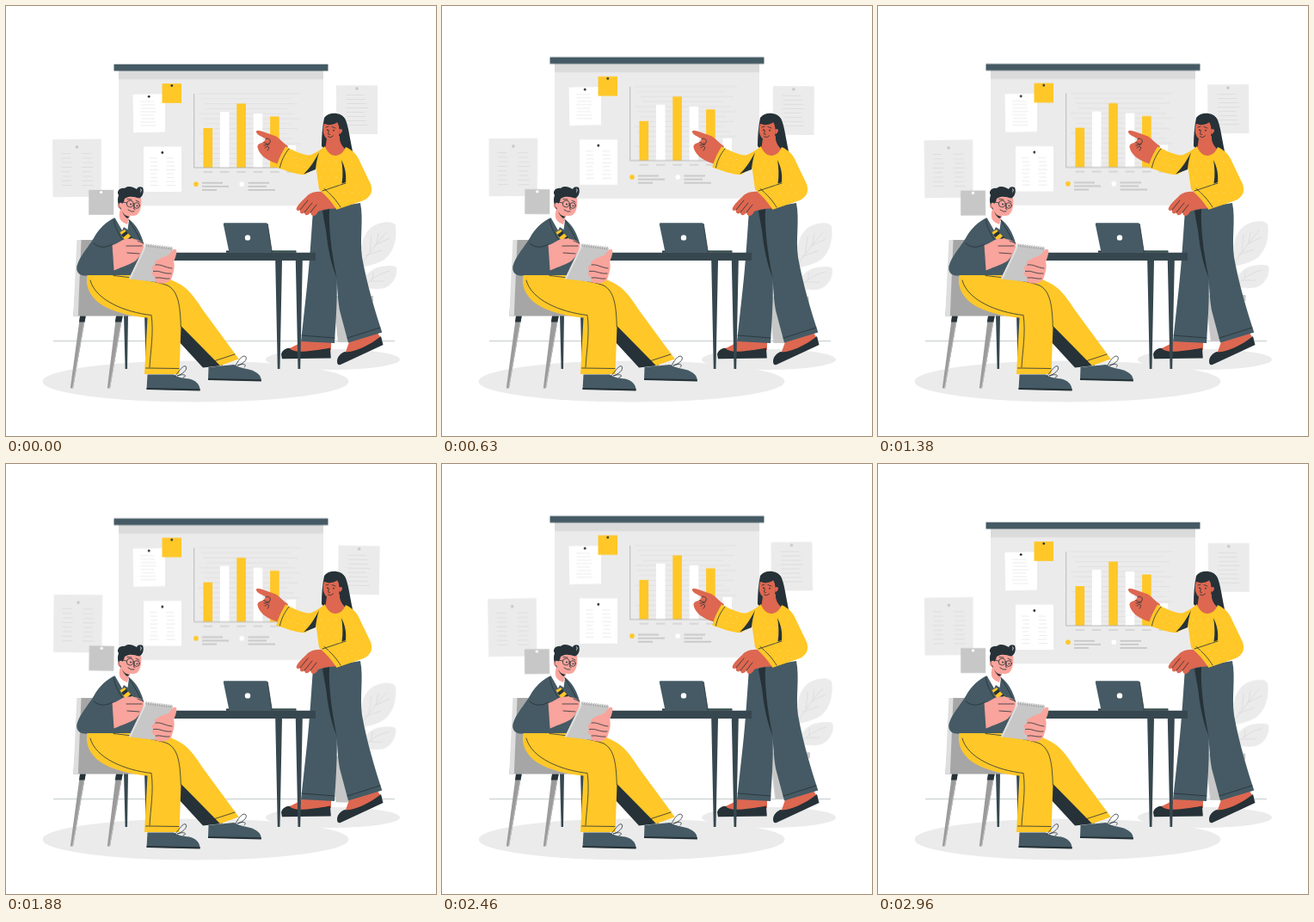
Write an HTML page that moves like this. It is 500 px wide and 500 px high and loops after 3000 ms.

```html
<!DOCTYPE html>
<html lang="en">
<head>
<meta charset="utf-8">
<title>Office presentation</title>
<style>
html, body { margin: 0; width: 100%; height: 100%; overflow: hidden; background: #fff; }
svg { display: block; width: 100vw; height: 100vh; }
#wall { transform-origin: 250px 250px; }
.y { fill: #ffc727; }
.s { fill: #455a64; }
.d { fill: #263238; }
.t { fill: #37474f; }
.w { fill: #fff; }
.l { fill: #ebebeb; }
.g { fill: #c7c7c7; }
.p { fill: #f9a49c; }
.r { fill: #dd6750; }
.ink { fill: none; stroke: #263238; stroke-width: .8; stroke-linecap: round; stroke-linejoin: round; }
.vein { fill: none; stroke: #dadada; stroke-width: .8; stroke-linecap: round; }
</style>
</head>
<body>
<svg viewBox="0 0 500 500">
  <!-- floor -->
  <ellipse class="l" cx="220.5" cy="436.5" rx="178" ry="24"/>
  <ellipse class="l" cx="380" cy="411" rx="78" ry="12"/>
  <path d="M55 389.6H452" stroke="#8a959b" stroke-width=".5"/>

  <g id="board">
    <rect class="l" x="131" y="75" width="238" height="157.3"/>
    <rect x="131" y="75" width="238" height="10.3" fill="#dbdbdb"/>
    <rect class="s" x="125.5" y="67.7" width="249" height="7.8"/>
    <g id="chart"></g>
    <path d="M218.7 102V188H343" fill="none" stroke="#adadad" stroke-width=".8"/>
    <rect class="y" x="218.3" y="204.5" width="5.4" height="5.4" rx="1.8"/>
    <rect class="w" x="271.5" y="204.5" width="5.4" height="5.4" rx="1.8"/>
    <path class="w" d="M147.5 102.8L185 102.3V146.6L148.3 147.2Z"/>
    <path class="w" d="M160 163.5H204V216H160Z"/>
    <path class="y" d="M181.5 90.2H204V112.8H181.5Z"/>
    <g id="boardText"></g>
    <circle class="d" cx="166.2" cy="105.3" r="1.4"/>
    <circle class="d" cx="181.8" cy="170.5" r="1.4"/>
    <circle class="d" cx="192.8" cy="92.6" r="1.4"/>
  </g>

  <g id="wall">
    <path class="l" d="M54 155.2L110.7 154.6V221.8L54.5 222.2Z"/>
    <path class="l" d="M384 92.2H432V149H384.3Z"/>
    <path class="g" d="M96.2 213.8H125.2V242.8H96.2Z"/>
    <g id="wallText"></g>
    <circle class="g" cx="82.5" cy="164" r="1.8"/>
    <circle class="g" cx="408" cy="96" r="1.8"/>
    <circle class="w" cx="110.6" cy="216.6" r="1.7"/>
    <!-- plant -->
    <path class="l" d="M412 304C410 285 414 267 424 258C434 250 450 249 453 255C455 268 452 284 442 293C433 300 421 302 412 304Z"/>
    <path class="l" d="M412 330C414 315 424 305 436 303C445 302 453 301 454.3 305C455 315 449 326 438 328.5C430 330 420 327 412 330Z"/>
    <path class="vein" d="M412 302C421 290 434 272 443 262M423 286L425 267M431 276L433 264M419 290L437 284M429 278L446 270M412 330C423 318 434 311 446 308M426 318L427 309M423 320L439 320"/>
    <path class="g" d="M376 337H427V344H422L417 391H386L381 344H376Z"/>
  </g>

  <!-- woman -->
  <path class="d" d="M370 130C375 123 389 123 394 131C398 138 399 150 404 173C390 176 377 173 367 163C367 151 368 140 370 130Z"/>
  <path class="r" d="M344 389H378V400L334 404L328 399C334 396 341 393 344 389Z"/>
  <path class="r" d="M400 388L432 380L437 388L402 407L395 402Z"/>
  <path class="d" d="M320 405C321 400 327 397 330 398C334 404 352 402 377 397.5L377.8 409.5L321 410.2Z"/>
  <path class="d" d="M385 413C385 408 390 403 394 402C400 404 420 397 436 384L438.5 394L389 417C386 418 385 416 385 413Z"/>
  <path class="s" d="M357 238C355 265 353 300 350 326L343 390L382 392C384 360 386 330 384 304C385 322 385 336 388 354L398 391.5L437.3 379.5C429 354 420 325 414 292C411 270 416 249 412 229Z"/>
  <path class="d" d="M368 238L376 236C375 256 378 284 384.5 316C378 300 374 280 372.5 264C371 254 369 246 368 238Z"/>
  <path class="ink" d="M344 383L382 386M397 386L435 374" stroke-width=".6"/>
  <path class="r" d="M373 154L388 151C388 160 391 164 397 167L392 175L376 176L371 168Z"/>
  <path class="r" d="M370 136C374 140 383 138 386 134C389 143 389 151 384 155C379 158 372 156 370 150C368 146 369 141 370 136Z"/>
  <path class="d" d="M369.5 137C371 126 388 122 394 131C398 141 398 157 403 172C396 169 390 164 388 154C388 146 388 139 385 135C381 137 374 137 369.5 137Z"/>
  <path class="r" d="M387 144C391 141 393 146 388 149Z"/>
  <path class="ink" d="M372 141L375 140M379 140.5L383 142M375.5 145L374.5 149L376.5 149.5M374.5 152Q378 154 380.5 151M392 139Q395 158 402 169"/>
  <circle class="d" cx="374" cy="144.2" r=".9"/><circle class="d" cx="381" cy="144.6" r=".9"/>
  <path class="r" d="M290.8 146.5C291 144 294 144.5 297 145.6L314 151.5C319 155 323 160 328 163L319 184C311 183 303 178 299 175C295 171 293 167 292.5 164C292 161 296 159 299.5 158.5L302 154.5C298 152 292 150 290.8 146.5Z"/>
  <path class="ink" d="M302 154.5C306 153 308 156 307 159C304 162 302 159 299.5 158.5M301 165C306 161 307 165 304 168M300 162L306 161" stroke-width=".7"/>
  <path class="y" d="M325 163.5C336 169 349 175 355 173C362 170 367 166 371 163C376 178 390 177 395 164C404 168 409 174 412 182L424 207C427 216 424 222 416 226L384.5 236.8C379 230 374 223 366.3 215.5L364 213L360.5 188L348 196C336 196 325 191 314.2 187.4C317 178 321 170 325 163.5Z"/>
  <path class="d" d="M346 195.5C354 188 360 178 364 170C361.5 178 360.5 184 360 190Z"/>
  <path class="d" d="M390 179C394 187 396 195 395 205L390.5 206.5C392 197 391.5 187 390 179Z"/>
  <path class="ink" d="M329 166C324 172 320 180 318.5 188M370 212.5C378 219 385 227 389 234M368 215L395 206" stroke-width=".7"/>
  <g id="dots" fill="#fff" fill-opacity=".5"></g>
  <path class="r" d="M366.5 215.8C359 215 352 218 349 222C345 226 340 230 337.8 235C337 238 340 239 342 237C341 241 344 243 347 240C347 244 351 244.5 354 240C355 246 360 245 363 239C370 236 376 235.5 383.5 235.5Q376 224 366.5 215.8Z"/>
  <path class="ink" d="M342 237L351 226M347 240L356 229M354 240L361 231" stroke-width=".7"/>

  <!-- chair and rear table legs -->
  <path class="t" d="M137 358H142L141 422H138.6ZM161 358H166L165 412H162.5Z"/>
  <path d="M84.5 272H112L120 312L163 352V360.5H78.3Z" fill="#a6a6a6"/>
  <path d="M82.4 272H87.5L83.8 360.5H78.3Z" fill="#dedede"/>
  <path d="M86 361H92.5L78 444.5H74.8ZM128 361H135.5L121 444.5H117.8Z" fill="#9b9b9b"/>
  <path d="M91 367L77.5 444M134 367L120.5 444" stroke="#bdbdbd"/>
  <path class="d" d="M86 360.5H92.8L91.5 367.5H85ZM128 360.5H135.8L134.3 367.5H126.8Z"/>

  <!-- table and laptop -->
  <path class="t" d="M190 286.7H360V296H190ZM313.2 296H321L318.5 422H315.8ZM336.8 296H344.8L342.2 422H339.5Z"/>
  <path class="d" d="M256 284.5H337.5V286.8H256Z"/>
  <path d="M308 285H337" stroke="#456b63"/>
  <path class="s" d="M254 252.2H302.5Q304 252.2 304.3 253.7L309.3 286.6H259.5L252.8 253.7Q252.5 252.2 254 252.2Z"/>
  <path class="ink" d="M304.3 253.7L309.3 286.3" stroke-width=".6"/>
  <circle class="w" cx="281" cy="269.4" r="3.2"/>

  <!-- man: body -->
  <path class="s" d="M127 246C117 250 108 259 102.5 269C96 280 85.5 291 82.5 302C81 309 85 313 91 313.5L126 315H152L160 276C157 264 151 254 143 248Z"/>
  <path class="w" d="M126.5 246L131 240L143 249L141.5 260L137 257L135 261Z"/>
  <path class="p" d="M133 236L145 240L141 254L136 251.5C131 248 131 243 133 236Z"/>
  <path class="y" d="M132.5 263L138 260L142 264.5L148 271L141 275L135.5 268.5Z"/>
  <path class="d" d="M134 266L140 261.5L142 264.5L136.5 269ZM139 272.5L145.5 267.5L147 269.5L141 274.5Z"/>
  <path class="ink" d="M125 248C127 259 132 267 138 276M143 249C148 257 153 265 156 272M102 276C110 283 118 280 124 277M124 278L126 306" stroke-width=".8"/>

  <!-- man: legs -->
  <path class="d" d="M200 368L252 418L229 420.5L200 389Z"/>
  <path class="y" d="M94.5 313H168C184 314 202 321 211 330C219 338 224 346 230 355L270.8 410.5L249 418.3L203.5 372L201.5 428H161L164.5 362.5C145 361 122 355 109 346C97 337 92 325 94.5 313Z"/>
  <path class="ink" d="M125 313.5C150 316 175 320 188 325C201 332 202.5 350 203.3 373" stroke-width="1.1"/>
  <path class="ink" d="M162.5 421L201 421.5M243 412.5L266 405M98 319C104 342 138 356 169 359.5C172 380 168 401 167 420" stroke-width=".7"/>
  <path class="s" d="M164.5 428.5H195C200 432 207 433 213 433.5C220 435 226 440 225.5 447L163.5 445.8Z"/>
  <path class="d" d="M163.5 444L225.8 445.3L225.5 447.5L163.5 446Z"/>
  <path class="s" d="M235.5 420L265 417C272 421 279 421.5 284 423C291 425 297 429 296.8 436L235 434.5Z"/>
  <path class="d" d="M235 433L296.8 434.3V436.5L235 435Z"/>
  <path class="ink" d="M196 431C202 424 206 417 209 419C212 423 204 429 199 430C207 427 212 430 206 432M267 418C271 410 276 405 279 408C281 412 274 417 269 418C276 415 281 417 277 420"/>

  <!-- man: head -->
  <path class="p" d="M134 219C141 222 151 219 157 223C158 230 157 239 152 243C145 246 136 242 134 236C129 236 128 229 133 229Z"/>
  <path class="d" d="M133.5 237C130 231 129 225 131 220C128 216 132 211 138 212C142 208 149 211 152 213C153 210 156 209.5 159 211C161 216 159 222 155 223.5C149 222 144 220 138 224C137 228 136 230 134.5 230Z"/>
  <path class="p" d="M136 230C131 226 129 233 135 236Z"/>
  <path class="w" d="M155.8 211.5L157.8 214L156 218L156.8 214Z"/>
  <circle class="ink" cx="144.2" cy="230" r="3.9"/><circle class="ink" cx="152" cy="232" r="3.3"/>
  <path class="ink" d="M136 228L140.3 229M141 224.5L146 225M151 226L155 228M149 231L148.6 236L150 236.5M142 237Q146 240 149 239"/>
  <path class="d" d="M135 238.5C137 243 140 244.5 144 244.8L141 247C138 245 136 242 135 238.5Z"/>
  <circle class="d" cx="145" cy="230.5" r=".9"/><circle class="d" cx="152.4" cy="232.3" r=".9"/>

  <!-- notebook and hands -->
  <path class="p" d="M123.5 278C131 276 134 271.5 141 270.5C150 270 157 272 160.5 277C160 284 156 291 151 296C146 300 136 303 125.5 307.5Z"/>
  <path class="ink" d="M140 279L158 279M141 287L155 288M153 273L160 276" stroke-width=".7"/>
  <path class="g" d="M162 277.5L194.3 281.5L178.5 321.5L142.8 317.3Z"/>
  <path d="M162 277.5L142.8 317.3L145 317.6L164 277.8Z" fill="#dedede"/>
  <g id="rings"></g>
  <path class="p" d="M177 295C181 292 187 291 190 289C192 285 195 281 198 283.5C199 287 197 293 195 297C197 305 194 312 192 318C188 323 179 323.5 174.5 321C172.5 319 173 317 174.5 316C170 315 169 311 171 308.5C169 305 170 302 173.5 301C172 298 174 296 177 295Z"/>
  <path class="ink" d="M174 301C181 300 184 304 193 305M171.5 308.5C179 307 183 312 192 311M174 316C181 315 184 318 190 317" stroke-width=".7"/>
</svg>
<script>
const $ = id => document.getElementById(id);

function add(parent, tag, attrs) {
  const el = document.createElementNS('http://www.w3.org/2000/svg', tag);
  for (const k in attrs) el.setAttribute(k, attrs[k]);
  $(parent).append(el);
}

function line(parent, x1, x2, y, stroke, width) {
  add(parent, 'path', { d: `M${x1} ${y}H${x2}`, stroke, 'stroke-width': width });
}

// Ragged lines of stand-in writing
function scribble(parent, x, y, w, rows, step, color) {
  for (let i = 0; i < rows; i++) {
    const left = x + (i * 7 % 3) * .7;
    line(parent, left, x + w * (.84 + (i * 5 % 4) * .05), y + i * step, color, .6);
  }
}

for (let i = 0; i < 15; i++) {
  line('chart', 224 + (i * 5 % 4) * 3, 343 - (i * 3 % 5) * 4, 102 + i * 5.8, '#dadada', .6);
}
[142, 123, 113.5, 125, 128.5, 162].forEach((top, i) => {
  const x = 229.5 + i * 19.4;
  add('chart', 'rect', { class: i % 2 ? 'w' : 'y', x, y: top, width: 10.6, height: 188 - top });
  line('chart', x, x + 10.6, 193, '#c7c7c7', 1.1);
});
[[228, 252, 259, 245], [281.5, 306, 303, 313]].forEach(([x, ...ends]) => {
  ends.forEach((end, i) => line('chart', x, end, 205.7 + i * 4.1, '#c7c7c7', 1.8));
});

scribble('boardText', 156, 111, 19, 8, 4, '#e0e0e0');
scribble('boardText', 167, 177, 10, 8, 4.5, '#e0e0e0');
scribble('boardText', 186, 177, 11, 8, 4.5, '#e0e0e0');
scribble('wallText', 64, 171.5, 13, 8, 5.3, '#d3d3d3');
scribble('wallText', 88, 171.5, 14, 8, 5.3, '#d3d3d3');
scribble('wallText', 395, 103.5, 26, 8, 5, '#d3d3d3');

for (let row = 0; row < 6; row++) {
  for (let col = 0; col < 6; col++) {
    const x = 366 + col * 9 + row % 2 * 4, y = 181 + row * 9;
    if (x < 404 + row * 3 && x > 363 + Math.max(0, row - 4) * 14 && !(x > 388 && x < 397 && row < 3)) {
      add('dots', 'circle', { cx: x, cy: y, r: .6 });
    }
  }
}
for (let i = 0; i < 6; i++) {
  add('dots', 'circle', { cx: 327 + i * 4, cy: 175 + i % 2 * 8 + i * .8, r: .6 });
}
for (let i = 0; i < 12; i++) {
  const x = 163.5 + i * 2.6, y = 278 + i * .32;
  add('rings', 'path', { d: `M${x} ${y + 2}q-1.6 -4 1 -3`, fill: 'none', stroke: '#8f8f8f', 'stroke-width': .7 });
}

const loop = { duration: 1500, iterations: Infinity };
const animations = [
  $('board').animate([
    { transform: 'translateY(0)', easing: 'ease-in-out' },
    { transform: 'translateY(-8.7px)', easing: 'ease-in-out' },
    { transform: 'translateY(0)' }
  ], loop),
  $('wall').animate([
    { transform: 'rotate(0deg)' },
    { transform: 'rotate(1deg)', offset: .25 },
    { transform: 'rotate(-1deg)', offset: .75 },
    { transform: 'rotate(0deg)' }
  ], loop)
];
const start = document.timeline.currentTime;
animations.forEach(a => { a.startTime = start; });
</script>
</body>
</html>
```
